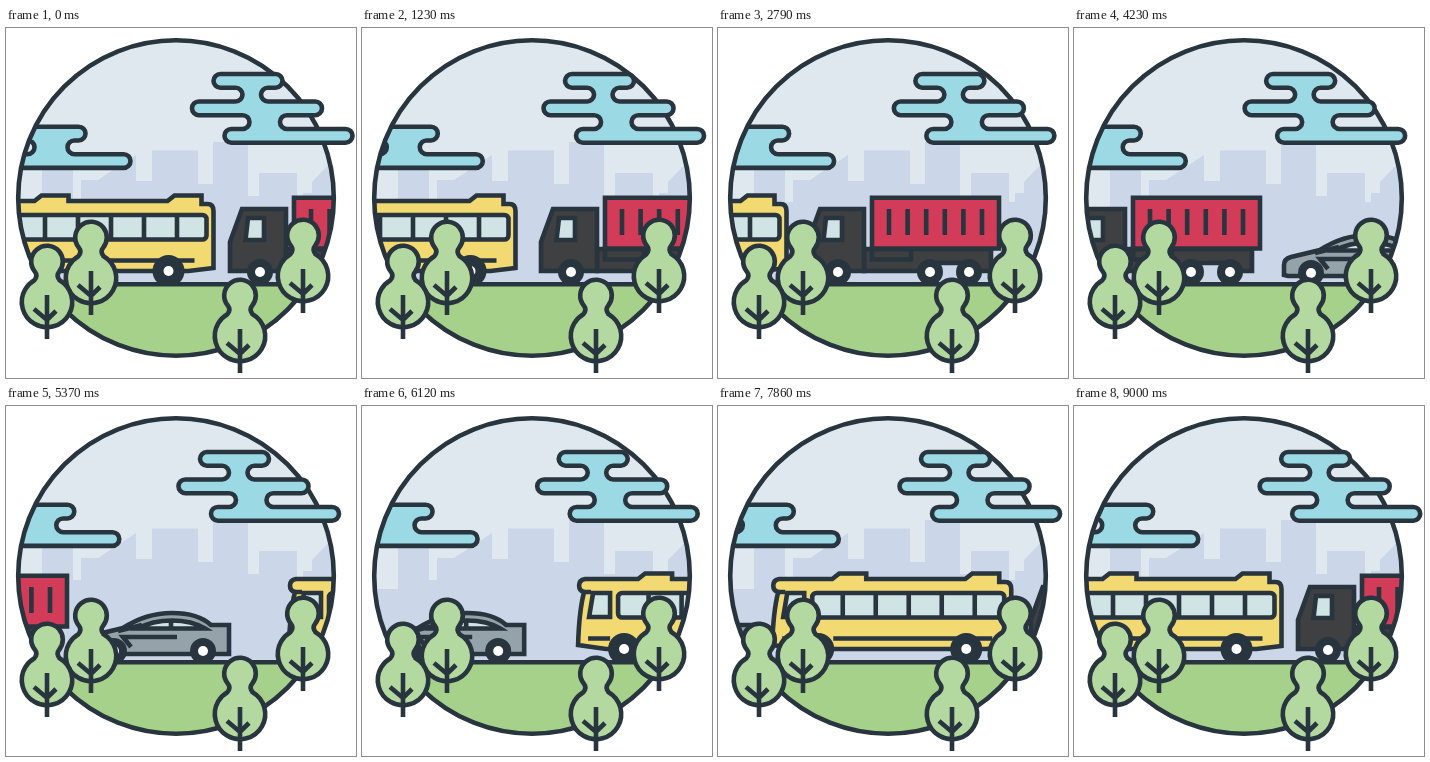
Write an HTML page with a canvas that moves like this. It is 350x350 px and loops after 9090 ms.

```html
<!DOCTYPE html>
<html lang="en">
<head>
<meta charset="utf-8">
<title>City traffic</title>
<style>
  html, body { margin: 0; width: 100%; height: 100%; overflow: hidden; background: #fff; }
  canvas { display: block; width: 350px; height: 350px; }
</style>
</head>
<body>
<canvas id="stage" width="350" height="350"></canvas>
<script>
const ctx = document.getElementById('stage').getContext('2d');
const LOOP = 9090, TICK = 30, Q = Math.PI / 2, DEG = Math.PI / 180;
const C = {
  ink: '#28353e', sky: '#dfe8ee', city: '#cbd6e8', grass: '#a6d18a', leaf: '#b3d9a0', cloud: '#9bd9e4',
  glass: '#d0e4e6', bus: '#f2d972', cab: '#3f4042', box: '#d33c59', car: '#94a3aa'
};

// ---- motion ----

// Traffic pauses: [start, length]
const HOLDS = [[2250, 180], [4680, 240], [7980, 150], [9000, 90]];
const clamp = (v, lo, hi) => Math.min(Math.max(v, lo), hi);
const pausedBy = t => HOLDS.reduce((sum, [start, len]) => sum + clamp(t - start, 0, len), 0);

function drivingTime(t) {
  const local = t % LOOP, laps = (t - local) / LOOP;
  return t - laps * pausedBy(LOOP) - pausedBy(local);
}

// Smooth curve through [time, x] points that keeps its end speeds outside them
function route(...points) {
  const keys = points.map(([t, x]) => [drivingTime(t), x]), last = keys.length - 1;
  const speed = keys.map((_, i) => {
    const a = keys[Math.max(i - 1, 0)], b = keys[Math.min(i + 1, last)];
    return (b[1] - a[1]) / (b[0] - a[0]);
  });
  return time => {
    const t = drivingTime(time);
    const end = t <= keys[0][0] ? 0 : t >= keys[last][0] ? last : -1;
    if (end >= 0) return keys[end][1] + speed[end] * (t - keys[end][0]);
    const i = keys.findIndex(k => k[0] > t) - 1;
    const [t0, x0] = keys[i], [t1, x1] = keys[i + 1];
    const h = t1 - t0, u = (t - t0) / h, v = 1 - u;
    return v * v * ((1 + 2 * u) * x0 + u * h * speed[i]) + u * u * ((1 + 2 * v) * x1 - v * h * speed[i + 1]);
  };
}

// ---- drawing helpers ----

function shape(d, fill) {
  const p = typeof d === 'string' ? new Path2D(d) : d;
  if (fill) { ctx.fillStyle = fill; ctx.fill(p); }
  ctx.stroke(p);
}

function rounded(x, y, w, h, r, fill) {
  const p = new Path2D();
  p.roundRect(x, y, w, h, r);
  shape(p, fill);
}

function line(x0, y0, x1, y1) {
  ctx.beginPath();
  ctx.moveTo(x0, y0);
  ctx.lineTo(x1, y1);
  ctx.stroke();
}

function bars(count, x, step, top, bottom) {
  for (let i = 0; i < count; i++) line(x + i * step, top, x + i * step, bottom);
}

function disc(x, y, r, fill) {
  ctx.fillStyle = fill;
  ctx.beginPath();
  ctx.arc(x, y, r, 0, 4 * Q);
  ctx.fill();
}

function wheels(y, r, ...xs) {
  for (const x of xs) {
    disc(x, y, r, C.ink);
    disc(x, y, 5, '#fff');
  }
}

function at(x, y, draw) {
  ctx.save();
  ctx.translate(x, y);
  draw();
  ctx.restore();
}

// ---- vehicles: x = 0 is the foremost point ----

function drawBus() {
  const hump = x => `H${x}l7 -5.500h27v5.500`;
  shape(`M7 173${hump(60)}${hump(193)}l0 3h6q6 0 6 7V240L214 243H28L0 239Q1 205 6 186`
    + 'Q1 185 1 179.500T7 173Z', C.bus);
  line(4, 186, 13, 186);
  shape('M15 187H32V211H11Z', C.glass);
  rounded(40, 187, 192, 24.5, 4, C.glass);
  bars(5, 70.5, 33, 187, 211);
  line(10, 232.5, 32, 232.5);
  line(61, 232.5, 220, 232.5);
  wheels(243, 16, 46, 194);
}

function drawTruck() {
  shape('M56 221H183V243H161V235H122V243H56Z', C.cab);
  shape('M0 243V214L12 181H56V243Z', C.cab);
  shape('M18 190H34V212H15.500Z', C.glass);
  ctx.strokeRect(64, 221, 39, 10.5);
  rounded(64, 169.7, 127, 50.8, 0, C.box);
  bars(6, 81, 18.6, 181, 207);
  wheels(244, 13, 30, 122, 161);
}

function drawCar() {
  shape('M0 247V237Q0 231 7 229L36 222Q59 207 85 207T124 219H142V248H4Z', C.car);
  shape('M51 222.500Q65 214.500 85 214.500T118 222.500Z', C.glass);
  line(84, 214, 84, 222);
  shape('M31 225L55 219M90 231H36L44 241');
  wheels(245, 13, 27, 116);
}

const traffic = [
  [drawBus, route([5370, 283], [6840, 151.5], [9090, -31.5], [10320, -85.5], [11880, -170.5])],
  [drawTruck, route([8130, 302], [9090, 224], [10320, 179], [11880, 90], [13320, -5], [14460, -130])],
  [drawCar, route([4230, 210], [5370, 81], [6840, -29])]
];

// ---- scenery ----

// Stacked rounded rows: tips alternate between lobes and notches from top to bottom
function cloudPath(top, left, right) {
  const r = 6.87, p = new Path2D();
  const bend = (tip, i, side) => {
    const notch = i % 2 === 1;
    p.arc(tip + (notch ? side : -side) * r, top + (2 * i + 1) * r, r, -side * Q, side * Q, notch);
  };
  right.forEach((tip, i) => bend(tip, i, 1));
  for (let i = left.length - 1; i >= 0; i--) bend(left[i], i, -1);
  p.closePath();
  return p;
}

const leftCloud = cloudPath(98.7, [-30, 28.5, -30], [79.5, 61.5, 124.5]);
const rightCloud = cloudPath(46, [207.5, 236.5, 186, 243.5, 218.5], [276.5, 255, 316, 274, 346.5]);

const crown = new Path2D();
crown.arc(0, -40.5, 15.8, 140 * DEG, 40 * DEG);
crown.quadraticCurveTo(8.9, -26.5, 12.6, -21.9);
crown.arc(0, 0, 25.2, -60 * DEG, 240 * DEG);
crown.quadraticCurveTo(-8.9, -26.5, -12.1, -30.3);
crown.closePath();

function drawTree() {
  shape(crown, C.leaf);
  shape('M0 -7V37M-13 7L0 18L9 9');
}

const trees = [[85, 250], [41, 274], [297, 248], [234, 308]];
const skyline = new Path2D('M0 256V183H36V140H67V174H75V152H92L130 127V153H146V122.500H192V156H207V114'
  + 'H242V168H253V145H291V174H297V165H306V154L340 119V256Z');
const frame = new Path2D();
frame.arc(170, 170, 157.8, 0, 4 * Q);

function render(t) {
  const drift = 1 - Math.abs(1 - 2 * t / LOOP);
  ctx.clearRect(0, 0, 350, 350);
  ctx.strokeStyle = C.ink;
  ctx.lineWidth = 4.6;

  ctx.save();
  ctx.clip(frame);
  ctx.fillStyle = C.sky;
  ctx.fillRect(0, 0, 350, 350);
  ctx.fillStyle = C.city;
  ctx.fill(skyline);
  at(-13.7 * drift, 0, () => shape(leftCloud, C.cloud));
  for (const [draw, position] of traffic) {
    at(position(t), 0, draw);
    at(position(t + LOOP), 0, draw);
  }
  ctx.fillStyle = C.grass;
  ctx.fillRect(0, 256, 350, 94);
  line(0, 256.3, 350, 256.3);
  ctx.restore();

  shape(frame);
  at(-16.5 * drift, 0, () => shape(rightCloud, C.cloud));
  for (const [x, y] of trees) at(x, y, drawTree);
}

const start = performance.now();
function loop() {
  const t = (performance.now() - start) % LOOP;
  render(Math.floor(t / TICK) * TICK);
  requestAnimationFrame(loop);
}
loop();
</script>
</body>
</html>
```
